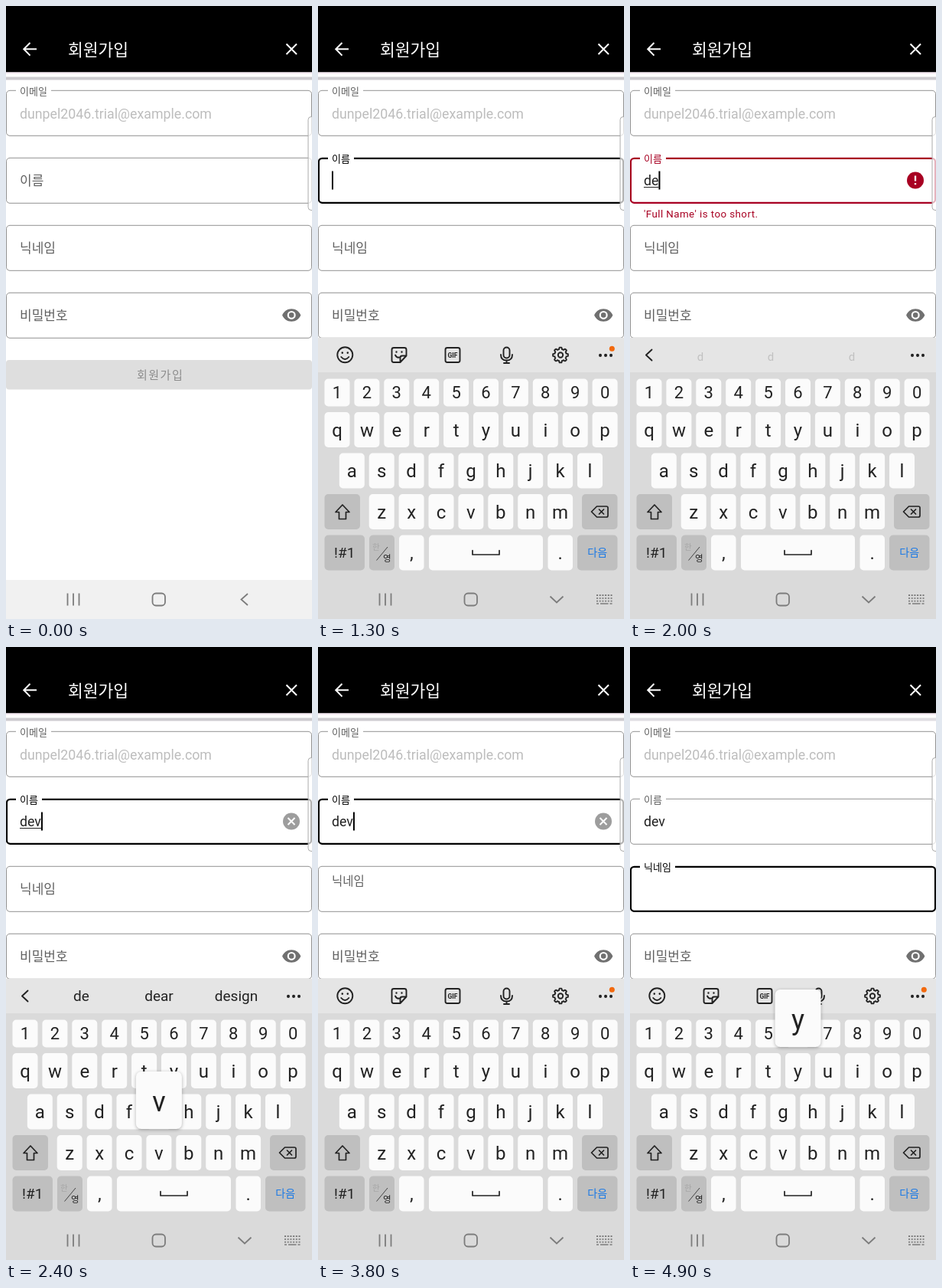
These frames come from a looping animation (400 by 800 pixels, 5000 ms). An HTML page:

```html
<!DOCTYPE html>
<html lang="ko">
<head>
<meta charset="utf-8">
<style>
html, body { margin: 0; width: 100%; height: 100%; overflow: hidden; background: #fff; }
svg { display: block; width: 400px; height: 800px; font-family: Roboto, "Noto Sans CJK KR", "Noto Sans CJK", sans-serif; }
text { white-space: pre; }
.line { fill: none; stroke: #222; stroke-width: 1.9; stroke-linecap: round; stroke-linejoin: round; }
.nav { fill: none; stroke: #7c7c7c; stroke-width: 1.8; }
.input { font-size: 17.78px; }
#form { font-weight: 500; }
#popup { filter: drop-shadow(0 1px 2px rgba(0, 0, 0, .3)); }
</style>
</head>
<body>
<svg id="stage" viewBox="0 0 400 800">
  <rect width="400" height="800" fill="#fff"/>

  <g id="header">
    <rect width="400" height="86.5" fill="#000"/>
    <rect y="86.5" width="400" height="2" fill="#f6e9f4"/>
    <rect id="shade" y="92.5" width="400" height="4"/>
    <path d="M40 56.3H23.5M31.5 48l-8.2 8.3 8.2 8.3M366.5 49.5l13.500 13.5M380 49.5L366.5 63" fill="none" stroke="#fff" stroke-width="2"/>
    <text x="81" y="64.6" font-size="21.5" font-weight="500" fill="#fff">회원가입</text>
  </g>

  <g id="form"></g>

  <text x="18" y="146.5" class="input" fill="#bdbdbd">dunpel2046.trial@example.com</text>
  <text id="name" x="18" y="234.3" class="input" fill="#222"></text>
  <path id="underline" stroke="#222" stroke-width="1"/>
  <rect id="caret" width="2" height="24" fill="#000"/>
  <text id="error" x="18" y="276" font-size="13.33" letter-spacing=".44" fill="#a80022">'Full Name' is too short.</text>
  <g id="alert">
    <circle cx="373" cy="227.5" r="11" fill="#a80022"/>
    <path d="M373 221.5v7M373 231v2.3" stroke="#fff" stroke-width="2.3"/>
  </g>
  <g id="clear">
    <circle cx="373" cy="227.5" r="11" fill="#757575"/>
    <path d="M368.5 223l9 9M377.5 223l-9 9" stroke="#fff" stroke-width="2"/>
  </g>
  <path transform="translate(360 390.2) scale(1.1)" fill="#707070" fill-rule="evenodd" d="M12 4.5C7 4.5 2.73 7.61 1 12c1.73 4.39 6 7.5 11 7.5s9.27-3.11 11-7.5c-1.73-4.39-6-7.5-11-7.5zM12 17a5 5 0 1 1 0-10 5 5 0 0 1 0 10zM12 9a3 3 0 1 0 0 6 3 3 0 0 0 0-6z"/>
  <rect y="462" width="400" height="38.5" rx="4" fill="#dedede"/>
  <text x="171" y="487" font-size="15" letter-spacing="1.5" font-weight="500" fill="#8c8c8c">회원가입</text>
  <path d="M401 144.5h-2q-4 0-4 4v114q0 4 4 4h2" fill="#fff" fill-opacity=".7" stroke="#aaa"/>

  <g id="board">
    <rect y="433" width="400" height="367" fill="#dadada"/>
    <rect y="433" width="400" height="45" fill="#e5e5e5"/>
    <g id="tools" class="line">
      <circle cx="35.3" cy="455.3" r="10"/>
      <path d="M30.300 458q5 6 10 0"/>
      <path d="M31.800 452.500v.1M38.800 452.500v.1" stroke-width="2.6"/>
      <path d="M99 446h14q2.500 0 2.500 2.500v8l-8 8.500h-8.500q-2.500 0-2.500-2.500v-14q0-2.500 2.500-2.500zM115 456.500h-5q-2.500 0-2.500 2.500v5.500M101 455.500q2 4 5 3"/>
      <path d="M102.500 451.500v.1M109.500 451.500v.1" stroke-width="2.4"/>
      <rect x="166.5" y="446" width="19" height="19" rx="2.5"/>
      <text x="176" y="458.7" font-size="8.5" font-weight="700" text-anchor="middle" fill="#222" stroke="none">GIF</text>
      <rect x="242.5" y="445.5" width="8" height="14" rx="4"/>
      <path d="M239 455q0 7.500 7.500 7.500t7.500-7.500M246.500 462.500v3.500M243 466h7"/>
      <path id="gear"/>
      <circle cx="317" cy="455.5" r="3.2"/>
      <circle cx="384.3" cy="447.3" r="3.5" fill="#f2690d" stroke="none"/>
    </g>
    <path id="less" class="line" d="M28.500 448.500l-7.500 7 7.500 7"/>
    <path class="line" d="M369 455.800v.1M376 455.800v.1M383 455.800v.1" style="stroke-width:4"/>
    <g id="hints" fill="#222" text-anchor="middle"></g>
    <g id="keys"></g>
    <path class="line" style="stroke-width:1.7" d="M32 651l9 9.500h-4.500v9h-9v-9H23zM364.500 653h12.500q2 0 2 2v10q0 2-2 2h-12.500l-7-7zM367.500 657l6 6M373.500 657l-6 6M202 710.500v5.500h35v-5.500"/>
    <text x="71" y="710" font-size="10.5" fill="#a6a6a6">한</text>
    <path d="M76.500 723.500L91 706" stroke="#444"/>
    <text x="85" y="724.5" font-size="11.5" fill="#222">영</text>
  </g>

  <rect id="navbar" y="749" width="400" height="51"/>
  <g class="nav">
    <path d="M80.500 766.500v16M88 766.500v16M95.500 766.500v16"/>
    <rect x="191.5" y="766.5" width="16.5" height="16" rx="4.5"/>
    <path id="back" d="M316 767l-8.500 7.500 8.500 7.500"/>
    <g id="down">
      <path d="M303.500 770.500l8.500 8 8.500-8"/>
      <path d="M364 769h20.500M364 772.800h20.500M364 776.600h20.500" stroke-dasharray="2 1.7"/>
      <path d="M364 780h3M369 780h10.500M381.500 780h3" stroke-width="1.4"/>
    </g>
  </g>

  <g id="popup">
    <rect width="60" height="75" rx="7" fill="#fbfbfb"/>
    <text x="30" y="52" font-size="36" text-anchor="middle" fill="#222"></text>
  </g>
</svg>
<script>
const LOOP = 5000, TICK = 100, HIDDEN = 320, RED = "#a80022";
const $ = id => document.getElementById(id);

function add(parent, tag, attrs, text) {
  const node = document.createElementNS("http://www.w3.org/2000/svg", tag);
  set(node, attrs);
  if (text) node.textContent = text;
  parent.append(node);
  return node;
}
function set(node, attrs) {
  for (const k in attrs) node.setAttribute(k, attrs[k]);
}
const show = (node, on) => set(node, { opacity: +on });

// Form fields
function makeField(y, label, gap) {
  const form = $("form");
  return {
    y,
    box: add(form, "rect", { fill: "none" }),
    gap: add(form, "rect", { x: 13, y: y - 3, width: gap, height: 7, fill: "#fff" }),
    label: add(form, "text", { x: 18 }, label)
  };
}
const fields = {
  email: makeField(110, "이메일", 46),
  name: makeField(198, "이름", 34),
  nick: makeField(286, "닉네임", 46),
  pass: makeField(374, "비밀번호", 58)
};

function drawField(f, lift, focused, open, color) {
  const inset = focused ? 1 : .5, size = 17 - 4 * lift;
  set(f.box, {
    x: inset, y: f.y + inset - .2, width: 400 - 2 * inset, height: 60 - 2 * inset, rx: 4.5,
    stroke: color || (focused ? "#000" : "#929292"), "stroke-width": focused ? 2.2 : 1
  });
  show(f.gap, open);
  set(f.label, {
    "font-size": size, y: f.y + 29.3 - 28 * lift + .38 * size,
    fill: color || (focused && lift > .5 ? "#000" : "#606060")
  });
}

// Keyboard
const PITCH = 38.9, keyPos = {};
function addKey(x, y, w, h, label, size, dark, color) {
  add($("keys"), "rect", { x, y, width: w, height: h, rx: 5, fill: dark ? "#bfbfbf" : "#fbfbfb" });
  if (label) add($("keys"), "text", {
    x: x + w / 2, y: y + h / 2 + size * .355, "font-size": size, "text-anchor": "middle", fill: color || "#222"
  }, label);
}
[["1234567890", 25, 486.5, 36, 22], ["qwertyuiop", 25, 530, 46, 24],
 ["asdfghjkl", 44.3, 583.5, 46, 24], ["zxcvbnm", 83.2, 637, 46, 24]].forEach(([row, x0, y, h, size]) => {
  [...row].forEach((ch, i) => {
    const cx = x0 + PITCH * i;
    keyPos[ch] = [cx, y];
    addKey(cx - 16.5, y, 33, h, ch, size);
  });
});
addKey(8.5, 637, 46.5, 46, "", 0, true);
addKey(345, 637, 46.5, 46, "", 0, true);
addKey(8.5, 690.5, 52.5, 46, "!#1", 19, true);
addKey(67, 690.5, 33, 46, "", 0, true);
addKey(106, 690.5, 32.5, 46, ",", 24);
addKey(145, 690.5, 149, 46);
addKey(300.5, 690.5, 32.5, 46, ".", 24);
addKey(339, 690.5, 52.5, 46, "다음", 14, true, "#1878e6");

let gear = "";
for (let i = 0; i < 96; i++) {
  const a = i / 96 * 2 * Math.PI;
  const r = 8.8 + 1.1 * Math.max(-1, Math.min(1, 2 * Math.cos(8 * a)));
  gear += (i ? "L" : "M") + (317 + r * Math.sin(a)).toFixed(2) + " " + (455.5 - r * Math.cos(a)).toFixed(2);
}
$("gear").setAttribute("d", gear + "z");

const hints = [0, 1, 2].map(() => add($("hints"), "text", {}));
const hintSets = {
  faint: { words: ["d", "d", "d"], x: [92, 184, 290], size: [15, 15, 15], y: 463, alpha: .18 },
  short: { words: ["de", "dear", "design"], x: [98.5, 200, 301], size: [19, 19, 19], y: 462, alpha: 1 },
  full: { words: ["development", "develop", "device"], x: [98.5, 200, 301], size: [16, 19, 19], y: 462, alpha: 1 }
};

// Each track holds a value from its time until the next entry
const tracks = {
  slide: [[0, HIDDEN], [400, 130], [500, 12], [600, 0]],
  focus: [[0, ""], [300, "name"], [2800, "nick"], [3800, "name"], [4100, "nick"]],
  caret: [[0, 0], [300, 1], [800, 0], [1300, 1], [3300, 0], [3800, 1], [4600, 0]],
  nameLift: [[0, 0], [300, .05], [400, .8], [500, 1]],
  nickLift: [[0, 0], [2800, .03], [2900, .75], [3000, 1], [3800, .38], [3900, 0], [4100, .03], [4200, .75], [4300, 1]],
  text: [[0, ""], [1800, "d"], [2000, "de"], [2400, "dev"]],
  compose: [[0, 0], [1800, 1], [2800, 0]],
  invalid: [[0, 0], [1800, 1], [2400, 0]],
  clear: [[0, 0], [2400, .7], [2500, 1], [2900, .5], [3000, 0], [3800, .7], [3900, 1], [4200, .4], [4300, 0]],
  hints: [[0, ""], [2000, "faint"], [2100, "short"], [2500, "full"], [2900, ""]],
  press: [[0, ""], [1700, "d"], [1900, "e"], [2000, ""], [2300, "v"], [2500, ""], [4900, "y"]],
  shade: [[0, "#cdcbcf"], [4200, "#dfdde2"]]
};
function stateAt(t) {
  const s = {};
  for (const k in tracks) s[k] = tracks[k].filter(step => step[0] <= t).pop()[1];
  return s;
}

function draw(t) {
  const s = stateAt(t), onName = s.focus === "name", onNick = s.focus === "nick", up = s.slide < HIDDEN;
  drawField(fields.email, 1, false, true);
  drawField(fields.name, s.nameLift, onName, onName || s.text, s.invalid && RED);
  drawField(fields.nick, s.nickLift, onNick, onNick);
  drawField(fields.pass, 0, false, false);

  $("name").textContent = s.text;
  const end = 18 + (s.text ? $("name").getComputedTextLength() : 0);
  set($("underline"), { d: `M18 236.5H${end}` });
  show($("underline"), s.compose);
  set($("caret"), { x: onNick ? 18 : end, y: onNick ? 303.5 : 215.5 });
  show($("caret"), s.caret);
  show($("error"), s.invalid);
  show($("alert"), s.invalid);
  show($("clear"), s.clear);
  set($("shade"), { fill: s.shade });

  set($("board"), { transform: `translate(0 ${s.slide})` });
  show($("board"), up);
  set($("navbar"), { fill: up ? "#dadada" : "#f1f1f1" });
  show($("back"), !up);
  show($("down"), up);

  const h = hintSets[s.hints];
  show($("tools"), !h);
  show($("less"), !!h);
  show($("hints"), h ? h.alpha : 0);
  if (h) hints.forEach((node, i) => {
    node.textContent = h.words[i];
    set(node, { x: h.x[i], y: h.y, "font-size": h.size[i] });
  });

  show($("popup"), !!s.press);
  if (s.press) {
    const [x, y] = keyPos[s.press];
    set($("popup"), { transform: `translate(${x - 30} ${y - 83})` });
    $("popup").lastElementChild.textContent = s.press;
  }
}

let last = -1;
const start = performance.now();
function frame(now) {
  const t = Math.floor(Math.max(0, now - start) % LOOP / TICK) * TICK;
  if (t !== last) draw(last = t);
  requestAnimationFrame(frame);
}
draw(0);
requestAnimationFrame(frame);
</script>
</body>
</html>
```
